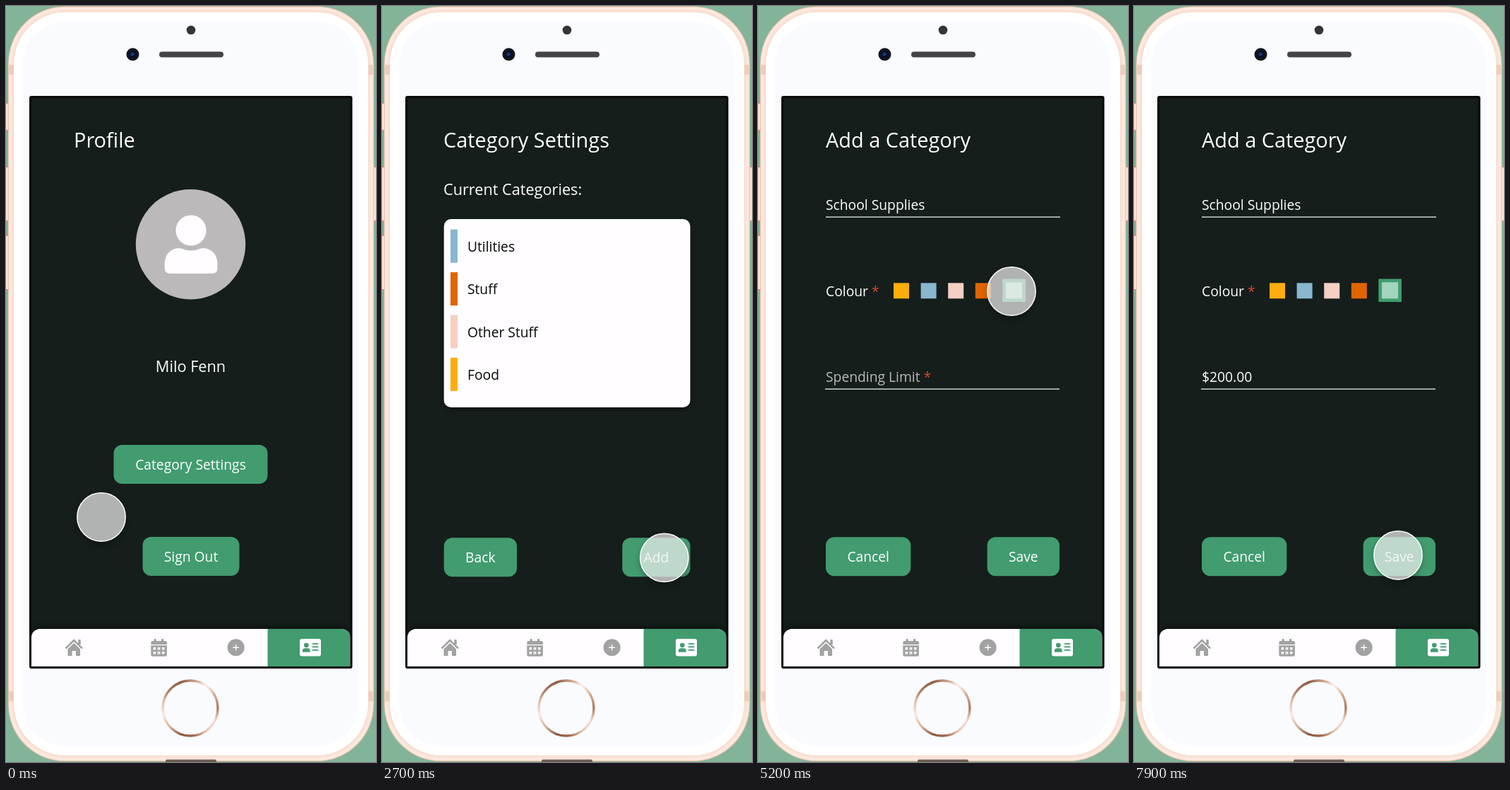
Recreate the animation shown at these times as an HTML page with a canvas. Size 524 px wide and 1068 px high, loop 8000 ms.

```html
<!DOCTYPE html>
<html lang="en">
<head>
<meta charset="utf-8">
<title>Budget app prototype</title>
<style>
html, body { margin: 0; width: 100%; height: 100%; overflow: hidden; background: #82b49a; }
canvas { display: block; }
</style>
</head>
<body>
<canvas id="stage" width="524" height="1068"></canvas>
<script>
const ctx = document.getElementById('stage').getContext('2d');
const LOOP = 8000;
const GREEN = '#429c6f', DARK = '#151e1b', WHITE = '#fffdff', GREY = '#a2a2a2';
const YELLOW = '#ffad0c', BLUE = '#88b8ce', PINK = '#f5cfc4', ORANGE = '#e06500', MINT = '#a2d5bd';
const TITLE = 28.9, SUBTITLE = 21.7, BODY = 19.27;

// Moments when the interface changes
const OPEN_SETTINGS = 1200, OPEN_FORM = 3200, FILL_NAME = 4600, PICK_COLOUR = 5150, FILL_LIMIT = 5800;

// Pointer path: time, x, y
const POINTER = [
  [0, 135, 722], [700, 262, 650], [1500, 264, 652], [2300, 400, 779],
  [3700, 399, 781], [4200, 234, 271], [4700, 234, 271], [5050, 359, 403],
  [5300, 359, 403], [5650, 270, 524], [5850, 270, 524], [6420, 374, 776], [LOOP, 374, 776]
];

function box(x, y, w, h, r, fill) {
  ctx.beginPath();
  ctx.roundRect(x, y, w, h, r);
  ctx.fillStyle = fill;
  ctx.fill();
}

function disc(x, y, r, fill) {
  ctx.beginPath();
  ctx.arc(x, y, r, 0, Math.PI * 2);
  ctx.fillStyle = fill;
  ctx.fill();
}

function text(str, x, y, size, fill = '#fff', align = 'left') {
  ctx.font = `${size}px "Open Sans", sans-serif`;
  ctx.textAlign = align;
  ctx.fillStyle = fill;
  ctx.fillText(str, x, y);
  return x + ctx.measureText(str).width;
}

function withShadow(color, blur, dy, draw) {
  ctx.save();
  ctx.shadowColor = color;
  ctx.shadowBlur = blur;
  ctx.shadowOffsetY = dy;
  draw();
  ctx.restore();
}

function button(label, x, y, w) {
  box(x, y, w, 55, 12, GREEN);
  text(label, x + w / 2, y + 35, BODY, '#fff', 'center');
}

function metal(stops) {
  const g = ctx.createLinearGradient(0, 0, 524, 0);
  stops.forEach((c, i) => g.addColorStop(i / (stops.length - 1), c));
  return g;
}

function drawPhone() {
  ctx.fillStyle = '#82b49a';
  ctx.fillRect(0, 0, 524, 1068);

  // Side keys
  for (const [x, y, h] of [[-3, 136, 41], [-3, 226, 79], [-3, 323, 79], [519, 226, 79]]) {
    box(x, y, 8, h, 2, '#c99478');
    box(x + 0.5, y + 2, 7, h - 4, 2, '#fae0d3');
  }

  // Nested shells from the outer rim to the glass
  const shells = [
    [0, '#efc7b1'], [1.3, '#fdebe2'], [4, '#fbe3d7'], [7, '#f6d9cb'], [8.2, '#ffffff'], [21, '#f9fbff']
  ];
  shells.forEach(([d, fill], i) => {
    box(3 + d, 0.5 + d, 518 - 2 * d, 1066.5 - 2 * d, 80 - d * 0.9, fill);
    if (i === 3) {
      for (const y of [83, 968]) {
        box(3, y, 8.2, 14, 0, '#efcdbc');
        box(512.8, y, 8.2, 14, 0, '#efcdbc');
      }
    }
  });

  box(226, 1064.5, 72, 6, 2, '#6d5a52');
  disc(262, 34, 6.3, '#343436');
  box(217, 64.5, 91, 8, 4, '#434345');
  disc(179.5, 68.3, 9, '#11161c');
  disc(179.5, 68.3, 5.5, '#07102a');
  disc(179, 68, 2.6, '#163a78');

  // Home button ring
  const ring = ctx.createConicGradient(0, 261, 992);
  const tones = ['#b27b5d', '#f5dfd2', '#e9c8b5', '#a06a4e', '#8d5b42', '#d9b49e', '#fbeae1',
    '#e2bda8', '#a9775b', '#8b5b43', '#c69a80', '#fff1e9', '#d5a88e', '#b27b5d'];
  tones.forEach((c, i) => ring.addColorStop(i / (tones.length - 1), c));
  ctx.beginPath();
  ctx.arc(261, 992, 39, 0, Math.PI * 2);
  ctx.strokeStyle = ring;
  ctx.lineWidth = 3.4;
  ctx.stroke();

  box(33, 127, 457.5, 809, 3, '#060908');
  box(36, 130, 451.5, 803, 0, DARK);
}

function drawHouse() {
  ctx.fillStyle = ctx.strokeStyle = GREY;
  ctx.lineWidth = 2.6;
  ctx.lineJoin = 'miter';
  ctx.beginPath();
  ctx.moveTo(84.5, 907.5);
  ctx.lineTo(96.2, 896);
  ctx.lineTo(108, 907.5);
  ctx.stroke();
  ctx.fillRect(102.3, 895, 3.4, 7);
  ctx.beginPath();
  for (const [x, y] of [[96.2, 900], [105, 908.5], [105, 918], [99, 918], [99, 911],
    [93.5, 911], [93.5, 918], [87.5, 918], [87.5, 908.5]]) ctx.lineTo(x, y);
  ctx.fill();
}

function drawCalendar() {
  box(205.3, 897, 22.6, 5, [2.5, 2.5, 0, 0], GREY);
  box(209.5, 894, 3.2, 5, 1, GREY);
  box(220, 894, 3.2, 5, 1, GREY);
  box(205.3, 903.3, 22.6, 15.5, [0, 0, 2.5, 2.5], GREY);
  for (let row = 0; row < 2; row++)
    for (let col = 0; col < 3; col++) box(208.5 + col * 6.2, 906 + row * 6, 3.6, 3.6, 0.5, WHITE);
}

function drawCard() {
  box(416, 894, 30, 24.5, 3, WHITE);
  disc(425.3, 903, 3.3, GREEN);
  box(419.8, 907.3, 11, 5.4, [4, 4, 1, 1], GREEN);
  for (const y of [900.2, 904.6, 909]) box(433.6, y, 8.8, 1.7, 0.5, GREEN);
}

function drawTabs() {
  ctx.save();
  ctx.beginPath();
  ctx.rect(36, 130, 451.5, 803);
  ctx.clip();
  withShadow('rgba(0,0,0,.55)', 10, -2, () => box(36, 880, 451.5, 53, [12, 12, 0, 0], WHITE));
  box(370.5, 880, 117, 53, [0, 12, 0, 0], GREEN);
  ctx.restore();
  drawHouse();
  drawCalendar();
  disc(325.6, 906.2, 12, GREY);
  box(321.3, 905.5, 8.6, 1.5, 0, WHITE);
  box(324.85, 901.9, 1.5, 8.6, 0, WHITE);
  drawCard();
}

function drawProfile() {
  text('Profile', 96, 200, TITLE);
  disc(261.5, 336.7, 77.7, '#bcb9bb');
  disc(262, 317, 21.6, WHITE);
  ctx.beginPath();
  ctx.moveTo(244, 342);
  ctx.bezierCurveTo(250, 342, 253, 345.5, 262, 345.5);
  ctx.bezierCurveTo(271, 345.5, 274, 342, 280, 342);
  ctx.bezierCurveTo(292, 343, 299.5, 352, 299.5, 364);
  ctx.lineTo(299.5, 370);
  ctx.quadraticCurveTo(299.5, 378, 291.5, 378);
  ctx.lineTo(232.5, 378);
  ctx.quadraticCurveTo(224.7, 378, 224.7, 370);
  ctx.lineTo(224.7, 364);
  ctx.bezierCurveTo(224.7, 352, 232, 343, 244, 342);
  ctx.fillStyle = WHITE;
  ctx.fill();
  text('Milo Fenn', 261.5, 517, SUBTITLE, '#fff', 'center');
  button('Category Settings', 152.5, 620, 218);
  button('Sign Out', 193.5, 750, 137);
}

function drawSettings() {
  text('Category Settings', 87, 200, TITLE);
  text('Current Categories:', 87, 267, SUBTITLE);
  withShadow('rgba(0,0,0,.35)', 6, 3, () => box(87.7, 301, 348.8, 266, 10, WHITE));
  const rows = [['Utilities', BLUE], ['Stuff', ORANGE], ['Other Stuff', PINK], ['Food', YELLOW]];
  rows.forEach(([label, color], i) => {
    const y = 315.7 + i * 60.4;
    box(97, y, 10, 47, 0, color);
    text(label, 121, y + 31.3, BODY, '#080808');
  });
  button('Back', 87.7, 751.3, 103.3);
  button('Add', 340.3, 751.3, 96.2);
}

function field(label, value, x, y) {
  if (value) text(value, 96, y, BODY);
  else text(' *', text(label, 96, y, BODY, '#b9bbba'), y, BODY, '#c8492f');
  box(x, y + 9.4, 332, 1.3, 0, '#f4f5f4');
}

function drawForm(t) {
  const picked = t >= PICK_COLOUR;
  text('Add a Category', 96, 200, TITLE);
  field('Category Name', t >= FILL_NAME && 'School Supplies', 96, 288);
  const labelEnd = text('Colour', 96, 409.5, BODY, picked ? '#fff' : '#b9bbba');
  text(' *', labelEnd, 409.5, BODY, '#c8492f');
  [YELLOW, BLUE, PINK, ORANGE, MINT].forEach((color, i) => {
    const x = 192 + i * 38.6;
    if (i === 4 && picked) {
      box(346.3, 385.5, 32.6, 32.6, 0, GREEN);
      box(351, 390.3, 23, 23, 0, color);
    } else box(x, 391.3, 22, 22, 0, color);
  });
  field('Spending Limit', t >= FILL_LIMIT && '$200.00', 95, 531);
  button('Cancel', 96, 750.3, 120.3);
  button('Save', 324.6, 750.3, 102.4);
}

function pointerAt(t) {
  const i = POINTER.findIndex(k => k[0] > t);
  const [t0, x0, y0] = POINTER[i - 1], [t1, x1, y1] = POINTER[i];
  const u = (t - t0) / (t1 - t0), e = u * u * (3 - 2 * u);
  return [x0 + (x1 - x0) * e, y0 + (y1 - y0) * e];
}

function drawPointer(t) {
  const [x, y] = pointerAt(t);
  // The shadow stays outside the translucent disc
  ctx.save();
  ctx.beginPath();
  ctx.rect(0, 0, 524, 1068);
  ctx.arc(x, y, 34, 0, Math.PI * 2);
  ctx.clip('evenodd');
  withShadow('rgba(0,0,0,.35)', 8, 4, () => disc(x, y, 34, '#fff'));
  ctx.restore();
  disc(x, y, 34.2, 'rgba(243,243,243,.7)');
  ctx.beginPath();
  ctx.arc(x, y, 34.2, 0, Math.PI * 2);
  ctx.strokeStyle = '#fcfcfc';
  ctx.lineWidth = 1.5;
  ctx.stroke();
}

const start = performance.now();
function render() {
  const t = (performance.now() - start) % LOOP;
  drawPhone();
  if (t < OPEN_SETTINGS) drawProfile();
  else if (t < OPEN_FORM) drawSettings();
  else drawForm(t);
  drawTabs();
  drawPointer(t);
  requestAnimationFrame(render);
}
render();
</script>
</body>
</html>
```
